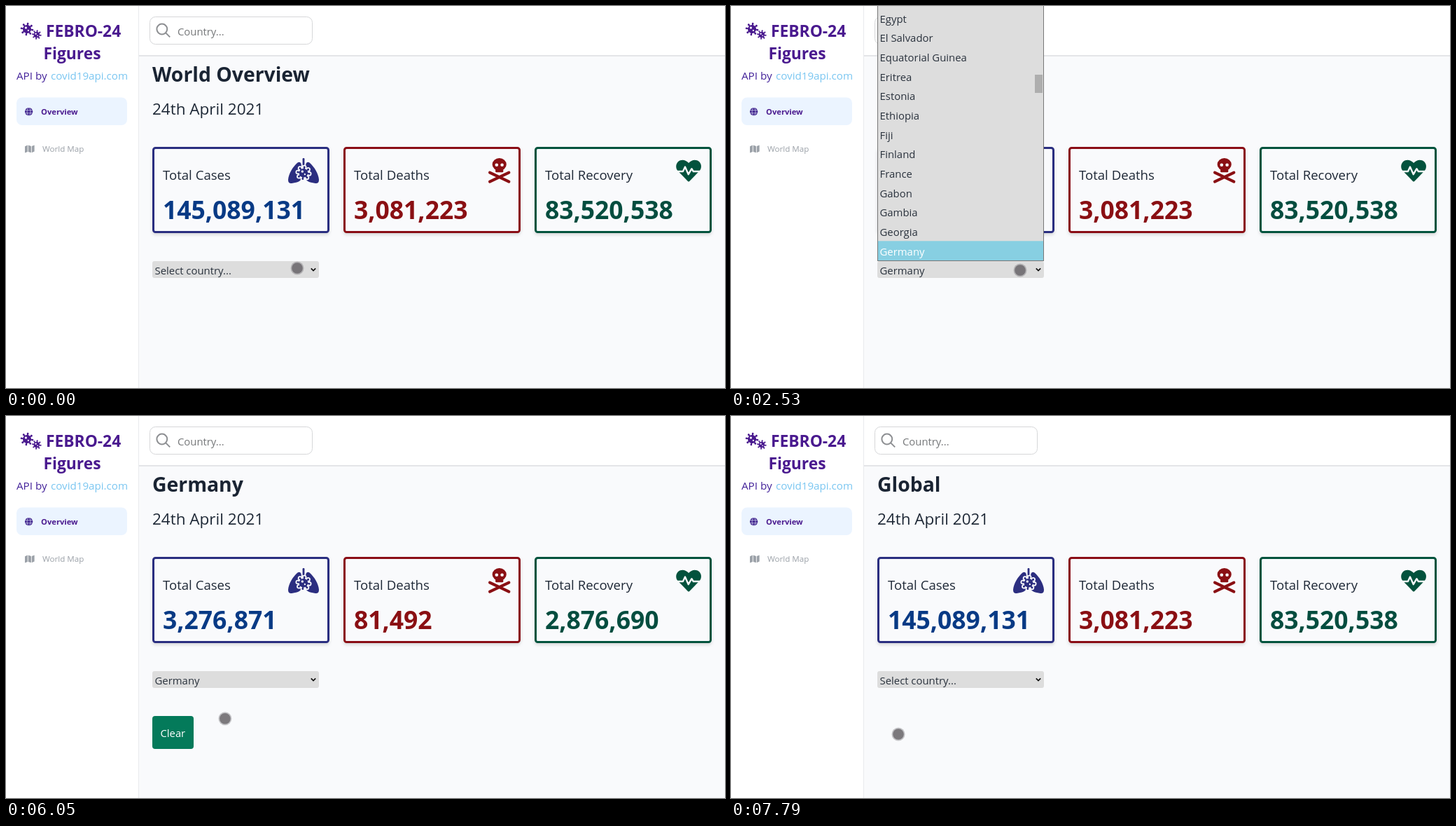
These frames come from a looping animation (1027 by 545 pixels, 8000 ms). An HTML page:

```html
<!DOCTYPE html>
<html lang="en">
<head>
<meta charset="utf-8">
<title>Case dashboard</title>
<style>
  html, body { margin: 0; width: 100%; height: 100%; overflow: hidden; background: #fff; }
  svg { display: block; width: 1027px; height: 545px; font-family: "Open Sans", "Noto Sans", sans-serif; }
  .bold { font-weight: 700; }
  .field { font-size: 14.9px; fill: #2a323d; }
  #list .chosen { fill: #fff; }
  #cursor { fill: rgba(95, 91, 97, .72); }
  #cursor .ring { fill: rgba(125, 122, 127, .42); }
  #cursor.pressed { fill: rgba(212, 200, 10, .7); }
  #cursor.pressed .ring { fill: rgba(180, 175, 20, .35); }
</style>
</head>
<body>
<svg viewBox="0 0 1027 545">
  <defs>
    <clipPath id="listClip"><rect x="210" width="236" height="363"/></clipPath>
    <filter id="soft" x="-5%" y="-5%" width="110%" height="120%">
      <feDropShadow dx="0" dy="2.5" stdDeviation="2" flood-opacity=".14"/>
    </filter>
  </defs>

  <rect width="1027" height="545" fill="#f9fafc"/>
  <text id="heading" class="bold" x="209" y="108" font-size="28.35" fill="#1a2433"></text>
  <text x="209" y="155" font-size="22.5" fill="#1f2937">24th April 2021</text>
  <g id="cards"></g>

  <rect x="209" y="364" width="238" height="24" rx="3" fill="#ddd"/>
  <rect id="focus" x="209.8" y="364.8" width="236.4" height="22.6" rx="2" fill="none" stroke="#ea9a25" stroke-width="1.6"/>
  <text id="choice" class="field" x="212.5" y="382.6"></text>
  <path d="M435.8 374.4l3.2 3.2 3.2-3.2" fill="none" stroke="#111" stroke-width="1.7"/>

  <g id="clear">
    <rect x="209" y="428" width="59" height="47" rx="4" fill="#047a5a"/>
    <text x="220.5" y="458" font-size="14.8" fill="#fff">Clear</text>
  </g>

  <!-- header -->
  <rect x="189" width="838" height="70" fill="#fff"/>
  <rect x="189" y="70" width="838" height="2" fill="#e4e5e8"/>
  <rect x="205.5" y="15.5" width="232" height="39" rx="8" fill="#fff" stroke="#d6d7d9"/>
  <g fill="none" stroke="#8d8f92" stroke-width="2">
    <circle cx="222.8" cy="33" r="7.4"/>
    <path d="M228.2 38.4l6 6"/>
  </g>
  <text x="245" y="42" font-size="14.85" fill="#757779">Country...</text>

  <!-- sidebar -->
  <rect width="189" height="545" fill="#fff"/>
  <rect x="189" width="1" height="545" fill="#e8eaed"/>
  <g id="brand"></g>
  <g class="bold" font-size="22.8" fill="#4a1a8f">
    <text x="57" y="44">FEBRO-24</text>
    <text x="94.5" y="76" text-anchor="middle">Figures</text>
  </g>
  <text x="15" y="104.5" font-size="15.2" fill="#44239a">API by</text>
  <text x="64" y="104.5" font-size="15.15" fill="#7ac6f1">covid19api.com</text>
  <rect x="15" y="130.5" width="158" height="39.5" rx="8" fill="#ebf4ff"/>
  <circle cx="32.6" cy="150.8" r="5.7" fill="#41268f"/>
  <g fill="none" stroke="#ebf4ff" stroke-width=".6">
    <path d="M27 148.8h11.2M27 152.8h11.2"/>
    <ellipse cx="32.6" cy="150.8" rx="2.5" ry="5.7"/>
  </g>
  <text class="bold" x="50" y="155" font-size="11.2" fill="#4a1a8f">Overview</text>
  <path d="M27 200.2l3.8-1.7v9.4l-3.8 1.5zM31.7 198.5l4.2 1.4v9.4l-4.2-1.4zM36.8 199.9l3.8-1.5v9.2l-3.8 1.7z" fill="#9ba1a8"/>
  <text x="52" y="208" font-size="11.6" fill="#9ba1a8">World Map</text>

  <g id="fetching">
    <rect x="189" y="72" width="838" height="473" fill="#e4e7eb"/>
    <rect x="189" y="72" width="1" height="473" fill="#d6d9dd"/>
    <text x="213" y="172" font-size="28.3" fill="#6b727d">Fetching data</text>
  </g>

  <g id="list">
    <rect x="209" width="238" height="364" fill="#777"/>
    <rect x="210" width="236" height="363" fill="#ddd"/>
    <g clip-path="url(#listClip)">
      <g id="rows"></g>
      <rect id="thumb" x="434" width="11" height="26" fill="#000" fill-opacity=".21"/>
    </g>
  </g>

  <g id="cursor"><circle class="ring" r="9.5"/><circle r="7.8"/></g>
</svg>

<script>
const LOOP = 8000, ROW = 27.69, PAPER = '#f9fafc';
const $ = id => document.getElementById(id);
const show = (id, on) => $(id).setAttribute('visibility', on ? 'visible' : 'hidden');
const within = (t, from, to) => t >= from && t < to;

// Round body with eight knobbed spikes
function virus(x, y, size, color, hole, grow = 0) {
  let spikes = '', knobs = '';
  for (let i = 0; i < 8; i++) {
    const a = i * Math.PI / 4, dx = Math.cos(a), dy = Math.sin(a);
    spikes += `M0 0L${dx * size * .85} ${dy * size * .85}`;
    knobs += `<circle cx="${dx * size * .85}" cy="${dy * size * .85}" r="${size * .15 + grow}"/>`;
  }
  return `<g transform="translate(${x} ${y}) rotate(8)" fill="${color}">
    <path d="${spikes}" stroke="${color}" stroke-width="${size * .2 + grow * 2}"/>${knobs}
    <circle r="${size * .64 + grow}"/>
    <circle cx="${-size * .2}" cy="${-size * .18}" r="${size * .17}" fill="${hole}"/>
    <circle cx="${size * .22}" cy="${size * .16}" r="${size * .12}" fill="${hole}"/></g>`;
}

const lobe = '<path d="M13.5 6.5C15.5 5 18.8 5.8 18.8 10V28C18.8 33.5 12 35 5 36C1.5 36.3 0 34.5 0 31C.6 22 7 12 13.5 6.5Z"/>';
const lungs = c => `<g transform="translate(403 217)" fill="${c}">${lobe}
  <g transform="translate(44) scale(-1 1)">${lobe}</g>
  <rect x="20.6" width="2.8" height="11" rx="1.2"/>
  ${virus(22, 21.2, 9.8, PAPER, PAPER, 1.8)}${virus(22, 21.2, 9.8, c, PAPER)}</g>`;
const skull = c => `<g transform="translate(704.7 217)" fill="${c}">
  <ellipse cy="9" rx="10.1" ry="9"/><rect x="-5.6" y="13" width="11.2" height="7.3" rx="1.4"/>
  <path d="M-13.7 20.6L13.7 33.6M13.7 20.6L-13.7 33.6" stroke="${c}" stroke-width="4" stroke-linecap="round"/>
  <circle cx="-3.9" cy="9.8" r="2.3" fill="${PAPER}"/><circle cx="3.9" cy="9.8" r="2.3" fill="${PAPER}"/></g>`;
const heart = c => `<g transform="translate(957.2 217) scale(.0699)">
  <path fill="${c}" d="M256 100C200 35 110 14 38 74C-10 124-12 203 31 256L243 474Q256 484 269 474L481 256C524 203 522 124 474 74C402 14 312 35 256 100Z"/>
  <path d="M0 272H139L183 180L251 332L318 217L352 272H512" fill="none" stroke="${PAPER}" stroke-width="34" stroke-linejoin="round"/></g>`;

const cards = [
  ['Total Cases', '#2c2e80', '#083a85', lungs],
  ['Total Deaths', '#8a0f13', '#8a0f13', skull],
  ['Total Recovery', '#02523d', '#044d3f', heart]
];
$('cards').innerHTML = cards.map(([label, line, ink, icon], i) => {
  const x = 209 + i * 273;
  return `<rect x="${x + 1.5}" y="202.5" width="250" height="120" rx="3" fill="${PAPER}"
      stroke="${line}" stroke-width="3" filter="url(#soft)"/>
    <text x="${x + 15}" y="248" font-size="18.6" fill="#1f2937">${label}</text>
    <text id="count${i}" class="bold" x="${x + 15}" y="304" font-size="35.5" fill="${ink}"></text>${icon(line)}`;
}).join('');
$('brand').innerHTML = virus(30, 33, 9.4, '#4a1a8f', '#fff') + virus(43.8, 41, 6.8, '#4a1a8f', '#fff');

const options = ('Select country...,Afghanistan,Albania,Algeria,Andorra,Angola,Antigua and Barbuda,' +
  'Argentina,Armenia,Australia,Austria,Azerbaijan,Bahamas,' +
  'Djibouti,Dominica,Dominican Republic,Ecuador,Egypt,El Salvador,Equatorial Guinea,Eritrea,Estonia,' +
  'Ethiopia,Fiji,Finland,France,Gabon,Gambia,Georgia,Germany').split(',');
$('rows').innerHTML = '<rect id="mark" x="210" width="236" height="27.7" fill="#87cfe2"/>' +
  options.map((name, i) => `<text class="field" x="212.5" y="${20.5 + i * ROW}">${name}</text>`).join('');
const rowTexts = $('rows').querySelectorAll('text');

const linear = u => u, easeIn = u => u ** 1.5, easeOut = u => 1 - (1 - u) ** 1.7;
// start, end, number of steps, x, y, easing
const moves = [
  [120, 180, 2, 416, 376, linear],
  [650, 830, 3, 413, 377, linear],
  [4390, 4650, 5, 410, 388, easeIn],
  [4715, 4970, 5, 388, 411, linear],
  [5030, 5170, 3, 388, 420, easeOut],
  [5710, 5970, 5, 335, 425, easeIn],
  [6035, 6430, 7, 239, 454, easeOut]
];
const presses = [[360, 510], [5490, 5570], [7330, 7470]];

function cursorAt(t) {
  let x = 416, y = 374;
  for (const [start, end, steps, toX, toY, ease] of moves) {
    if (t < start) break;
    const step = Math.floor((t - start) / (end - start) * (steps - 1)) + 1;
    const u = ease(Math.min(1, step / steps));
    x += (toX - x) * u;
    y += (toY - y) * u;
  }
  return [x, y];
}

function chosenAt(t) {
  if (t < 2210 || t >= 7470) return options[0];
  return t < 2330 ? 'Gabon' : t < 2470 ? 'Georgia' : 'Germany';
}

function drawList(chosen) {
  const index = options.indexOf(chosen);
  const last = options.length - 1;
  $('rows').setAttribute('transform', `translate(0 ${index ? 335.3 - index * ROW : 0})`);
  $('mark').setAttribute('y', index * ROW);
  $('thumb').setAttribute('y', index ? 98 - (last - index) * 1.9 : 0);
  rowTexts.forEach((row, i) => row.classList.toggle('chosen', i === index));
}

function draw(t) {
  const local = within(t, 3170, 7470), chosen = chosenAt(t);
  $('heading').textContent = local ? 'Germany' : t < 3170 ? 'World Overview' : 'Global';
  const counts = local ? ['3,276,871', '81,492', '2,876,690'] : ['145,089,131', '3,081,223', '83,520,538'];
  counts.forEach((n, i) => { $('count' + i).textContent = n; });
  $('choice').textContent = chosen;
  show('focus', within(t, 3170, 5490));
  show('clear', local);
  show('fetching', within(t, 7470, 7790));
  show('list', within(t, 430, 3170));
  drawList(chosen);
  const [x, y] = cursorAt(t);
  $('cursor').setAttribute('transform', `translate(${x} ${y})`);
  $('cursor').classList.toggle('pressed', presses.some(([from, to]) => within(t, from, to)));
}

const began = performance.now();
function frame() {
  draw((performance.now() - began) % LOOP);
  requestAnimationFrame(frame);
}
frame();
</script>
</body>
</html>
```
